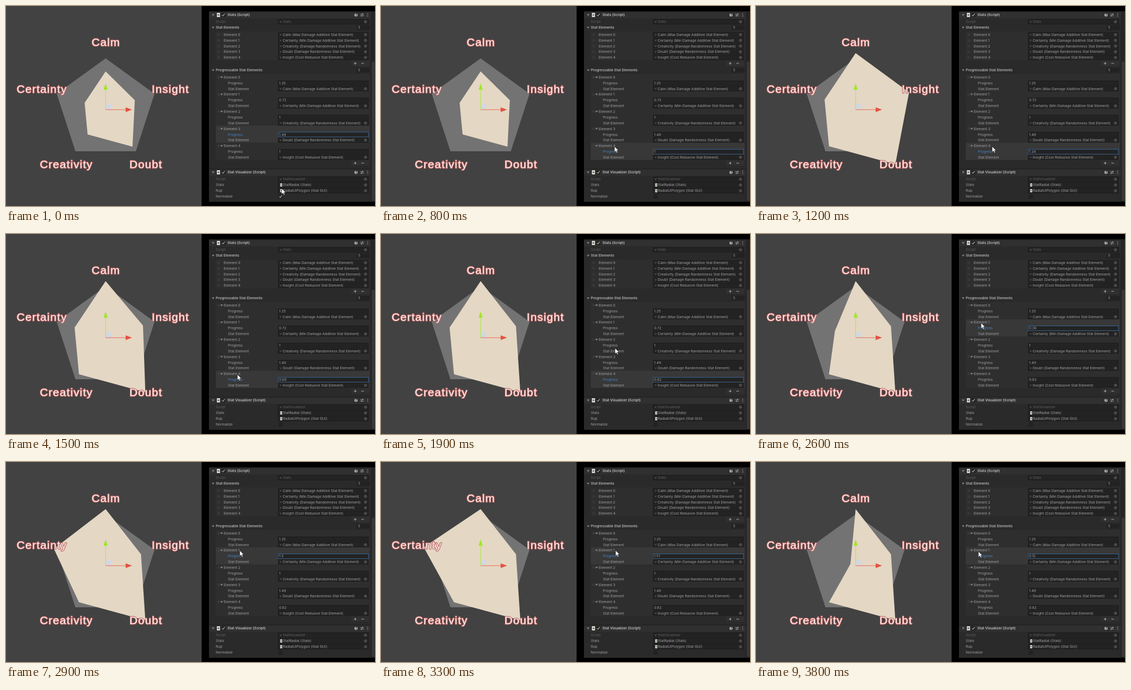
Write an HTML page with a canvas that moves like this. It is 700 px wide and 380 px high and loops after 3.9 s.

```html
<!DOCTYPE html>
<html lang="en">
<head>
<meta charset="utf-8">
<title>Stat radar</title>
<style>
html, body { margin: 0; width: 100%; height: 100%; overflow: hidden; background: #000; }
canvas { display: block; }
</style>
</head>
<body>
<canvas id="stage" width="700" height="380"></canvas>
<script>
const ctx = document.getElementById('stage').getContext('2d');
const LOOP = 3900, STEP = 100;
const CENTER = { x: 189, y: 197 };
const STATS = [
  'Calm (Max Damage Additive Stat Element)',
  'Certainty (Min Damage Additive Stat Element)',
  'Creativity (Damage Randomness Stat Element)',
  'Doubt (Damage Randomness Stat Element)',
  'Insight (Cost Redusive Stat Element)'
];
const LABELS = [['Calm', 189, 76], ['Certainty', 67.5, 165], ['Creativity', 114, 308], ['Doubt', 265, 308], ['Insight', 311.5, 165]];

// Keyframes: [time, value...]
const certainty = [[2400, .72], [2500, .48], [2600, .36], [2700, .6], [2800, 1.2], [2900, 1.5], [3000, 1.79],
  [3100, 1.55], [3200, 1.32], [3300, 1.51], [3400, 1.3], [3500, 1], [3600, .5], [3700, .12]];
const insight = [[800, 1], [900, 1.24], [1200, 1.24], [1500, .68], [1700, .82]];
const pointer = [[0, 523, 347], [200, 521, 359], [300, 521, 359], [700, 443, 267], [800, 443, 267], [900, 448, 267],
  [1200, 448, 267], [1500, 439, 267], [1700, 441, 267], [1900, 444, 217], [2300, 433, 170], [2400, 433, 170],
  [2600, 427, 169], [3000, 449, 168], [3200, 442, 168], [3300, 445, 168], [3700, 422, 170]];

function track(keys, t) {
  if (t <= keys[0][0]) return keys[0].slice(1);
  for (let i = 1; i < keys.length; i++) {
    const a = keys[i - 1], b = keys[i];
    if (t <= b[0]) return a.slice(1).map((v, k) => v + (b[k + 1] - v) * (t - a[0]) / (b[0] - a[0]));
  }
  return keys[keys.length - 1].slice(1);
}

const statsAt = t => [1.25, track(certainty, t)[0], 1, 1.49, track(insight, t)[0]];

function box(x, y, w, h, color) {
  ctx.fillStyle = color;
  ctx.fillRect(x, y, w, h);
}

function shape(points, color) {
  ctx.beginPath();
  points.forEach(([x, y]) => ctx.lineTo(x, y));
  ctx.closePath();
  ctx.fillStyle = color;
  ctx.fill();
}

function line(points, color, width = 1) {
  ctx.beginPath();
  points.forEach(([x, y], i) => i ? ctx.lineTo(x, y) : ctx.moveTo(x, y));
  ctx.strokeStyle = color;
  ctx.lineWidth = width;
  ctx.stroke();
}

function text(str, x, y, color = '#a2a2a2', weight = 400) {
  ctx.font = `${weight} 6.7px Inter, sans-serif`;
  ctx.fillStyle = color;
  ctx.fillText(str, x, y + 2.4);
}

function radar(radii, color) {
  shape(radii.map((r, i) => {
    const a = i * Math.PI * 2 / 5;
    return [CENTER.x - r * Math.sin(a), CENTER.y - r * Math.cos(a)];
  }), color);
}

function drawRadar(t) {
  box(0, 0, 371, 380, '#424242');
  radar(Array(5).fill(97.5), '#737373');
  const shown = Math.max(0, t - STEP);
  const scale = t < 1000 ? 58.2 : 86;
  radar(statsAt(shown).map(v => v * scale), '#e4d7c4');

  box(189, 186, 11, 11, '#d3d7df');
  line([[189, 197], [189, 159]], '#a5ee32');
  shape([[189, 147], [185, 159], [193, 159]], '#a3e52b');
  line([[189, 197], [229, 197]], '#ee6250');
  shape([[239, 197], [227, 192.5], [227, 201.5]], '#e25340');

  ctx.font = '21px "Liberation Sans", Arial, sans-serif';
  ctx.letterSpacing = '1.3px';
  ctx.textAlign = 'center';
  ctx.lineJoin = 'round';
  ctx.lineWidth = 2.4;
  ctx.strokeStyle = '#bd6464';
  ctx.fillStyle = '#fff0ec';
  for (const [name, x, y] of LABELS) {
    ctx.strokeText(name, x + .6, y);
    ctx.fillText(name, x + .6, y);
  }
  ctx.letterSpacing = '0px';
  ctx.textAlign = 'left';
}

const arrow = (x, y) => shape([[x - 2.5, y - 1.5], [x + 2.5, y - 1.5], [x, y + 2]], '#858585');
const tick = (x, y) => line([[x - 2.5, y], [x - .7, y + 2], [x + 2.5, y - 2.3]], '#c4c4c4', 1.1);

function handle(y) {
  box(401, y - 1.5, 5, .7, '#4b4b4b');
  box(401, y + .8, 5, .7, '#4b4b4b');
}

function page(x, y, w, h) {
  box(x - w / 2, y - h / 2, w, h, '#d6d9d2');
  box(x - w / 4, y - h / 6, w / 2, h / 3, '#58715b');
}

function field(y, focused) {
  box(516, y - 4.8, 172, 9.6, focused ? '#3a72b0' : '#181818');
  box(516.7, y - 4, 170.6, 8.2, '#232323');
}

function objectField(str, y, kind) {
  field(y);
  if (kind === 'page') page(522, y, 4, 6);
  else line([[519.5, y - 1.5], [521, y + 1.5], [522.5, y - 1.5]], '#62666a', .8);
  text(str, 525, y, kind === 'dim' ? '#606060' : undefined);
  ctx.beginPath();
  ctx.arc(682, y, 2.3, 0, 7);
  ctx.strokeStyle = '#777';
  ctx.lineWidth = .8;
  ctx.stroke();
  box(681.3, y - .7, 1.4, 1.4, '#888');
}

function header(title, y) {
  box(385, y - 6.5, 307, 13, '#303030');
  box(385, y - 6.5, 307, .8, '#191919');
  arrow(393, y);
  page(403, y, 6, 8);
  box(408.5, y - 4, 7.5, 8, '#222');
  tick(412.3, y);
  text(title, 420, y, '#c2c2c2', 600);
  ctx.beginPath();
  ctx.arc(664, y, 3, 0, 7);
  ctx.fillStyle = '#b0b0b0';
  ctx.fill();
  text('?', 662.5, y, '#303030', 700);
  line([[672, y - 1.5], [679, y - 1.5]], '#aaa', .8);
  line([[672, y + 1.5], [679, y + 1.5]], '#aaa', .8);
  box(676, y - 3, 1, 3, '#aaa');
  box(674, y, 1, 3, '#aaa');
  for (let d = -2.5; d < 3; d += 2.5) box(685.5, y + d - .6, 1.2, 1.2, '#aaa');
}

function listTitle(title, y) {
  arrow(393, y);
  text(title, 398, y, '#b4b4b4', 600);
  box(665, y - 4.5, 25, 9, '#222');
  text('5', 668, y);
}

function listFooter(y) {
  box(655, y - 5, 34, 10, '#303030');
  line([[660, y], [665, y]], '#bbb', .9);
  line([[662.5, y - 2.5], [662.5, y + 2.5]], '#bbb', .9);
  line([[674, y], [679, y]], '#bbb', .9);
}

function drawInspector(t) {
  box(371, 0, 329, 380, '#000');
  box(385, 10, 307, 362, '#2a2a2a');
  box(692, 10, 8, 362, '#252525');
  box(694, 106, 5, 264, '#393939');

  header('Stats (Script)', 17);
  text('Script', 398, 30, '#606060');
  objectField('Stats', 30, 'dim');
  listTitle('Stat Elements', 41);
  box(398, 48.5, 292, 55, '#2e2e2e');
  STATS.forEach((name, i) => {
    const y = 54.5 + i * 10.83;
    handle(y);
    text('Element ' + i, 413, y);
    objectField(name, y);
  });
  listFooter(109);

  listTitle('Progressable Stat Elements', 122);
  box(398, 129, 292, 164, '#2e2e2e');
  const focus = t < 700 ? 3 : t < 2400 ? 4 : 1;
  const values = statsAt(t);
  STATS.forEach((name, i) => {
    const y = 135.5 + i * 32.55, focused = i === focus;
    if (focused) box(398, y - 6, 292, 32.5, '#383838');
    handle(y);
    arrow(409, y);
    text('Element ' + i, 413, y);
    text('Progress', 421, y + 11, focused ? '#4785c4' : undefined);
    field(y + 11, focused);
    text(String(+values[i].toFixed(2)), 518, y + 11);
    text('Stat Element', 421, y + 21.7);
    objectField(name, y + 21.7);
  });
  listFooter(298.5);

  header('Stat Visualizer (Script)', 316);
  text('Script', 398, 329, '#606060');
  objectField('StatVisualizer', 329, 'dim');
  text('Stats', 398, 340);
  objectField('StatRadial (Stats)', 340, 'page');
  text('Rup', 398, 351);
  objectField('RadialUIPolygon (Stat GUI)', 351, 'page');
  text('Normalize', 398, 362);
  box(517, 358, 8, 8, '#222');
  if (t < 300) tick(521, 362);
}

function drawPointer(t) {
  const [x, y] = track(pointer, t);
  const outline = [[0, 0], [0, 10.5], [2.5, 8.3], [4.3, 12], [6, 11.2], [4.3, 7.6], [7.5, 7.4]].map(([dx, dy]) => [x + dx, y + dy]);
  shape(outline, '#fff');
  line([...outline, outline[0]], '#222', .6);
}

function frame(now) {
  const t = Math.floor(now % LOOP / STEP) * STEP;
  drawInspector(t);
  drawRadar(t);
  drawPointer(t);
  requestAnimationFrame(frame);
}
requestAnimationFrame(frame);
</script>
</body>
</html>
```
